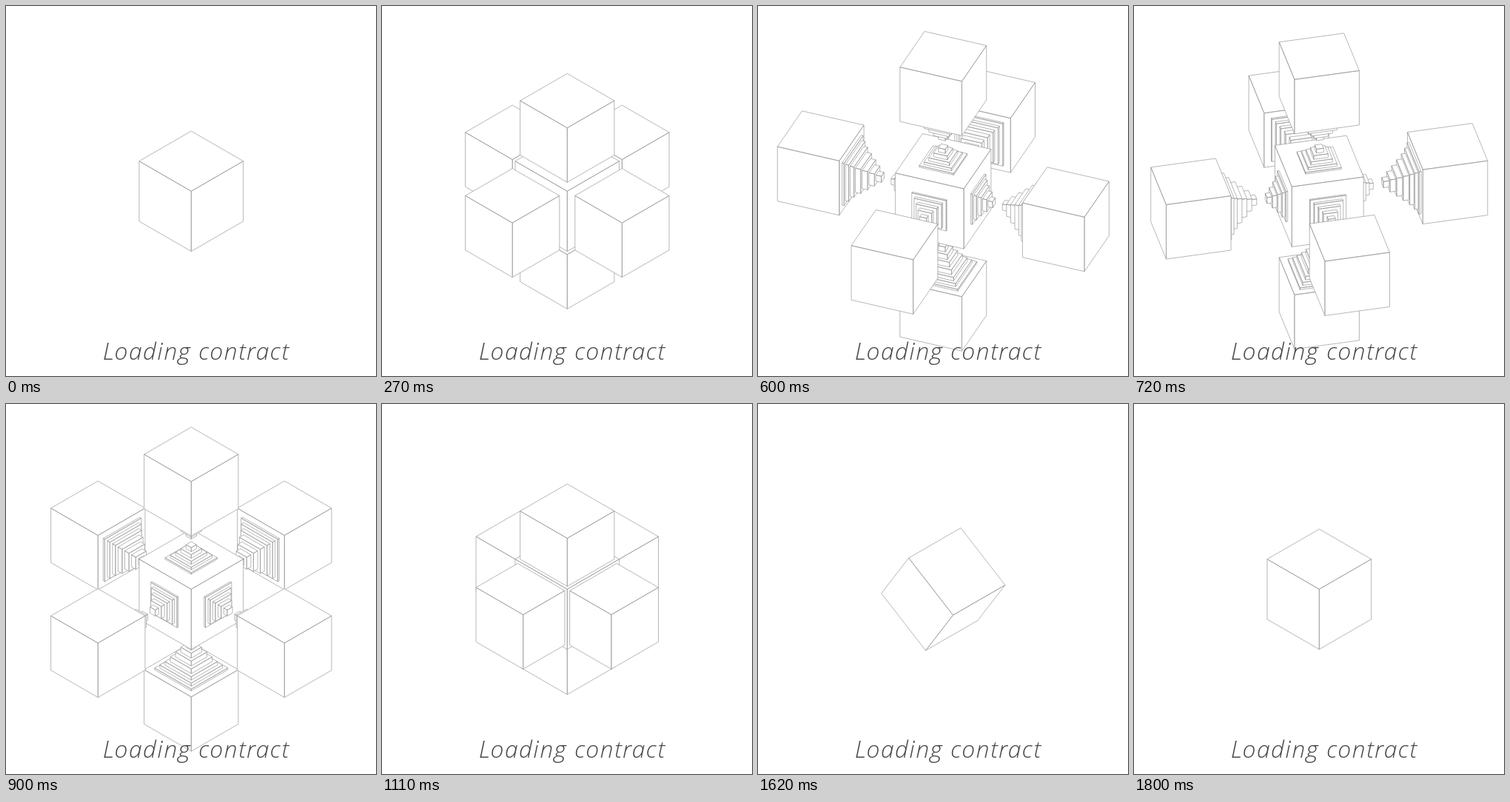
These frames come from a looping animation (500x500 px, 1830 ms). An HTML page with a canvas:

```html
<!DOCTYPE html>
<html lang="en">
<head>
<meta charset="utf-8">
<title>Loading contract</title>
<style>
html, body { margin: 0; width: 100%; height: 100%; overflow: hidden; background: #fff; }
canvas, svg { position: absolute; left: 0; top: 0; width: 500px; height: 500px; }
text { font: italic 300 32px "Open Sans", "Noto Sans", sans-serif; letter-spacing: 1.5px; fill: #484848; }
</style>
</head>
<body>
<canvas id="stage" width="500" height="500"></canvas>
<svg viewBox="0 0 500 500"><text x="257" y="478" text-anchor="middle">Loading contract</text></svg>
<script>
const ctx = document.getElementById('stage').getContext('2d');
const TICK = 30, TICKS = 61, PHASE = 15;
const CORE = 49.75, MIDDLE = 250.3;

// Nested cubes of one arm when fully open: [size, distance from the centre]
const ARM = [
  [50, 27.2], [40, 36.2], [30, 46.2], [20, 57.2], [10, 68.8],
  [10, 93], [20, 106], [30, 119], [40, 132], [50, 144.8], [60, 155.5], [70, 165.3],
  [90, 178.2]
];

const smooth = p => p * p * (3 - 2 * p);
const spread = p => 1 - Math.pow(1 - Math.pow(p, 2.366), 2.5);
const mix = (a, ka, b, kb) => a.map((v, i) => v * ka + b[i] * kb);

// Screen x, screen y and depth of the three cube axes
function axes(yaw, roll) {
  const flat = a => [Math.sin(a), Math.cos(a) / Math.sqrt(3), Math.cos(a) * Math.sqrt(2 / 3)];
  const x = flat(Math.PI / 4 + yaw), y = flat(yaw - Math.PI / 4);
  const z = [0, -Math.sqrt(2 / 3), 1 / Math.sqrt(3)];
  const c = Math.cos(roll), s = Math.sin(roll);
  return [mix(x, c, z, s), y, mix(z, c, x, -s)];
}

// Outline of the merged arm outside the core, as slabs {from, to, size}
function slabs(open) {
  const parts = ARM.map(([size, at]) => ({
    size, from: Math.max(CORE, at * open - size / 2), to: at * open + size / 2
  })).filter(s => s.to > CORE + 0.01);
  const cuts = [...new Set(parts.flatMap(s => [s.from, s.to]))].sort((a, b) => a - b);
  const out = [];
  for (let i = 1; i < cuts.length; i++) {
    const from = cuts[i - 1], to = cuts[i], mid = (from + to) / 2;
    const size = Math.max(0, ...parts.filter(s => s.from < mid && s.to > mid).map(s => s.size));
    const last = out[out.length - 1];
    if (!size) continue;
    if (last && last.size === size && last.to === from) last.to = to;
    else out.push({ from, to, size });
  }
  return out;
}

// One path for the three visible faces, so shared edges are inked once
function drawBox(base, centre, half) {
  const side = base.map(b => b[2] > 0 ? 1 : -1);
  const flip = side[0] * side[1] * side[2];
  ctx.beginPath();
  for (let n = 0; n < 3; n++) {
    const u = (n + 1) % 3, v = (n + 2) % 3;
    // Same winding for every face
    const turn = side[n] * flip;
    for (const [a, b] of [[-1, -1], [1, -1], [1, 1], [-1, 1]]) {
      const p = centre.slice();
      p[n] += side[n] * half[n];
      p[u] += side[u] * a * half[u];
      p[v] += side[v] * b * half[v];
      const at = k => p[0] * base[0][k] + p[1] * base[1][k] + p[2] * base[2][k];
      const move = a === -1 && b === -1 ? 'moveTo' : 'lineTo';
      ctx[move](MIDDLE + at(0), MIDDLE + at(1));
    }
    ctx.closePath();
  }
  ctx.fill();
  ctx.stroke();
}

function drawArm(base, parts, axis, sign, near) {
  for (const s of near ? parts : [...parts].reverse()) {
    const centre = [0, 0, 0], half = Array(3).fill(s.size / 2);
    centre[axis] = sign * (s.from + s.to) / 2;
    half[axis] = (s.to - s.from) / 2;
    drawBox(base, centre, half);
  }
}

function draw(tick) {
  const phase = Math.floor(tick / PHASE) % 4, p = tick % PHASE / PHASE;
  const turn = smooth(p) * Math.PI / 2;
  const open = [spread(p), 1, spread(1 - p), 0][phase];
  const base = axes(phase === 1 ? turn : 0, phase === 3 ? turn : 0);
  const parts = slabs(open);

  ctx.clearRect(0, 0, 500, 500);
  ctx.fillStyle = '#fff';
  ctx.strokeStyle = '#989898';
  ctx.lineWidth = 0.7;
  ctx.lineJoin = 'round';

  const arms = near => base.forEach((b, axis) => {
    const toward = b[2] > 0 ? 1 : -1;
    drawArm(base, parts, axis, near ? toward : -toward, near);
  });
  arms(false);
  drawBox(base, [0, 0, 0], [CORE, CORE, CORE]);
  arms(true);
}

const start = performance.now();
function frame() {
  draw(Math.floor((performance.now() - start) / TICK) % TICKS);
  requestAnimationFrame(frame);
}
frame();
</script>
</body>
</html>
```
